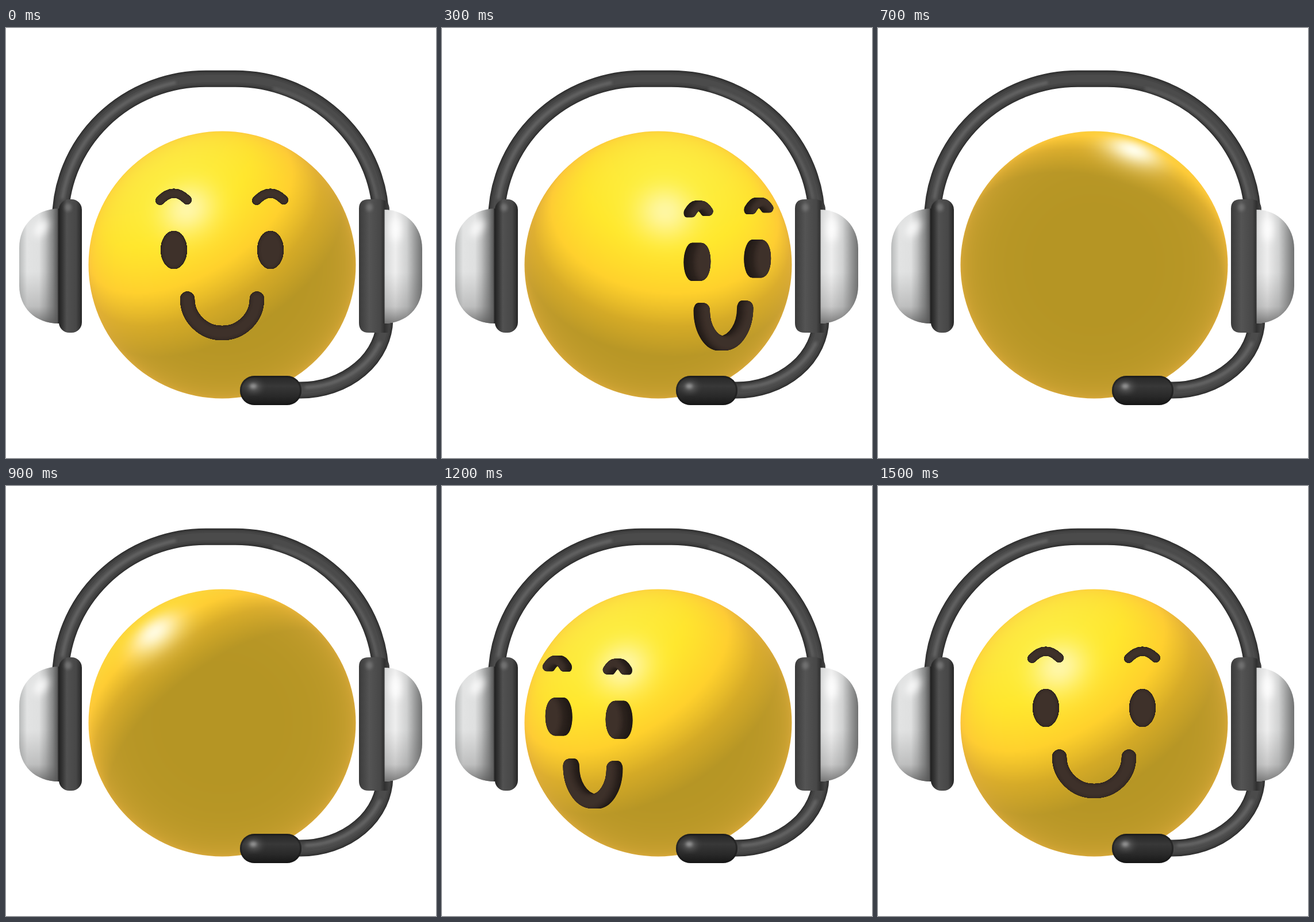
Recreate the animation shown at these times as an HTML page with a canvas. Size 748 px wide and 748 px high, loop 3000 ms.

```html
<!DOCTYPE html>
<html lang="en">
<head>
<meta charset="utf-8">
<title>Headset smiley</title>
<style>
  html, body { margin: 0; width: 100%; height: 100%; overflow: hidden; background: #fff; }
  canvas, svg { position: absolute; left: 0; top: 0; width: 748px; height: 748px; }
</style>
</head>
<body>
<canvas id="stage" width="748" height="748"></canvas>
<svg viewBox="0 0 748 748">
  <defs>
    <filter id="soft" x="-50%" y="-50%" width="200%" height="200%"><feGaussianBlur stdDeviation="2.5"/></filter>
    <filter id="wide" x="-80%" y="-80%" width="260%" height="260%"><feGaussianBlur stdDeviation="7"/></filter>
    <linearGradient id="barL">
      <stop offset="0" stop-color="#222"/><stop offset=".14" stop-color="#333"/>
      <stop offset=".34" stop-color="#515151"/><stop offset=".75" stop-color="#474747"/>
      <stop offset="1" stop-color="#262626"/>
    </linearGradient>
    <linearGradient id="barR">
      <stop offset="0" stop-color="#3a3a3a"/><stop offset=".16" stop-color="#474747"/>
      <stop offset=".34" stop-color="#545454"/><stop offset=".7" stop-color="#474747"/>
      <stop offset=".84" stop-color="#303030"/><stop offset="1" stop-color="#444"/>
    </linearGradient>
    <linearGradient id="cupL">
      <stop offset="0" stop-color="#b8baba"/><stop offset=".2" stop-color="#e2e3e3"/>
      <stop offset=".5" stop-color="#dfe0e0"/><stop offset=".66" stop-color="#bebfbf"/>
      <stop offset=".85" stop-color="#858686"/><stop offset="1" stop-color="#4a4a4a"/>
    </linearGradient>
    <linearGradient id="cupR">
      <stop offset="0" stop-color="#d4d5d5"/><stop offset=".3" stop-color="#eee"/>
      <stop offset=".6" stop-color="#cfd0d0"/><stop offset=".85" stop-color="#929393"/>
      <stop offset="1" stop-color="#707171"/>
    </linearGradient>
    <linearGradient id="fall" x2="0" y2="1">
      <stop offset=".55" stop-color="#666" stop-opacity="0"/>
      <stop offset=".85" stop-color="#666" stop-opacity=".28"/>
      <stop offset="1" stop-color="#555" stop-opacity=".75"/>
    </linearGradient>
    <linearGradient id="mic" x2="0" y2="1">
      <stop offset="0" stop-color="#252525"/><stop offset=".35" stop-color="#383838"/>
      <stop offset=".7" stop-color="#292929"/><stop offset="1" stop-color="#171717"/>
    </linearGradient>
    <path id="band" d="M94.500 334A253 246 0 0 1 347.500 88.300H399A253 246 0 0 1 652 334"/>
    <path id="arm" d="M659 505A147 125 0 0 1 512 630H506"/>
    <path id="cupShapeL" d="M92 314C50 315 23 344 23 382V448C23 486 50 514 92 514Z"/>
    <path id="cupShapeR" d="M657 316C697 316 724 346 724 384V448C724 486 697 514 657 514Z"/>
  </defs>

  <g fill="none">
    <g id="tubes"></g>
    <g filter="url(#soft)" stroke-linecap="round">
      <path d="M98 296A251 244 0 0 1 294 95" stroke="#858585" stroke-width="4" opacity=".65"/>
      <path d="M466 106A247 240 0 0 1 645 296" stroke="#777" stroke-width="4" opacity=".6"/>
      <path d="M650 548A145 122 0 0 1 522 625" stroke="#828282" stroke-width="5" opacity=".6"/>
    </g>
  </g>

  <rect x="92" y="298" width="40" height="232" rx="18" fill="url(#barL)"/>
  <path d="M614 314Q614 298 631 298H648Q667 298 667 316V530H631Q614 530 614 513Z" fill="url(#barR)"/>
  <ellipse cx="632" cy="312" rx="6" ry="7" fill="#888" opacity=".55" filter="url(#soft)"/>
  <ellipse cx="108" cy="312" rx="6" ry="7" fill="#888" opacity=".6" filter="url(#soft)"/>

  <use href="#cupShapeL" fill="url(#cupL)"/>
  <use href="#cupShapeL" fill="url(#fall)"/>
  <ellipse cx="61" cy="348" rx="9" ry="17" fill="#fff" opacity=".9" filter="url(#wide)" transform="rotate(32 61 348)"/>
  <use href="#cupShapeR" fill="url(#cupR)"/>
  <use href="#cupShapeR" fill="url(#fall)"/>
  <ellipse cx="678" cy="350" rx="9" ry="22" fill="#fff" filter="url(#wide)"/>
  <path d="M91.500 314V514M657.500 316V514" stroke="#222" stroke-width="2.500" opacity=".75"/>

  <rect x="407" y="605" width="107" height="51" rx="25" fill="url(#mic)"/>
  <rect x="408.500" y="606.500" width="104" height="48" rx="23.500" fill="none" stroke="#141414" stroke-width="3" opacity=".45"/>
  <ellipse cx="431" cy="624" rx="10" ry="6" fill="#aaa" opacity=".75" filter="url(#wide)"/>
  <ellipse cx="430" cy="623" rx="6" ry="4" fill="#bbb" opacity=".6" filter="url(#soft)"/>
</svg>
<script>
const CX = 376, CY = 412, R = 232.5;
const LOOP = 3000, STEP = 100, LAST = 15;
const ctx = document.getElementById('stage').getContext('2d');

// Headset tubes: nested strokes give a rounded profile.
const tubeShades = [[29, '#303030'], [25, '#3b3b3b'], [20, '#454545'], [13, '#4b4b4b']];
document.getElementById('tubes').innerHTML = ['band', 'arm'].map(id =>
  tubeShades.map(([w, c]) => `<use href="#${id}" stroke="${c}" stroke-width="${w}"/>`).join('')
).join('');

const mix = (a, b, p) => a + (b - a) * p;

// Linear interpolation through rows of [position, value, ...].
function lookup(rows, x, col = 1) {
  let i = 0;
  while (i < rows.length - 2 && x > rows[i + 1][0]) i++;
  const a = rows[i], b = rows[i + 1];
  const p = Math.min(1, Math.max(0, (x - a[0]) / (b[0] - a[0])));
  return mix(a[col], b[col], p);
}

// Step -> light azimuth, and step -> face yaw, in degrees.
const lightTurn = [[0, -41], [3, 8], [5, 54.5], [7, 159], [10, 268], [12, 319], [15, 319]];
const faceTurn = [[0, 0], [5, 90], [10, 270], [15, 360]];

// Light level -> sphere colour.
const skin = [
  [0, 181, 149, 36], [0.28, 212, 170, 38], [0.52, 255, 209, 44],
  [0.78, 255, 232, 44], [1, 253, 240, 62]
];
const ramp = Array.from({ length: 257 }, (_, i) => [1, 2, 3].map(c => lookup(skin, i / 256, c)));
const rimColor = [250, 188, 80];
const glossColor = [255, 253, 232];

const size = Math.ceil(R * 2) + 2;
const ball = document.createElement('canvas');
ball.width = ball.height = size;
const ballCtx = ball.getContext('2d');
const image = ballCtx.createImageData(size, size);

function shadeBall(azimuth) {
  const a = azimuth * Math.PI / 180;
  const lx = 0.69 * Math.sin(a), ly = -0.724, lz = 0.69 * Math.cos(a);
  const n = Math.hypot(lx, ly, lz + 1);
  const hx = lx / n, hy = ly / n, hz = (lz + 1) / n;
  const gloss = Math.min(1, 0.52 + 0.9 * (1 - hz));
  const px = image.data;
  for (let j = 0; j < size; j++) {
    for (let i = 0; i < size; i++) {
      const x = (i + 0.5 - size / 2) / R, y = (j + 0.5 - size / 2) / R;
      const z = Math.sqrt(Math.max(0, 1 - x * x - y * y));
      const lit = Math.max(0, Math.min(1, x * lx + y * ly + z * lz));
      const base = ramp[Math.round(lit * 256)];
      const rim = 0.55 * Math.pow(1 - z, 2);
      const shine = gloss * Math.pow(Math.max(0, x * hx + y * hy + z * hz), 45);
      const o = (j * size + i) * 4;
      for (let c = 0; c < 3; c++) {
        px[o + c] = mix(mix(base[c], rimColor[c], rim), glossColor[c], shine);
      }
      px[o + 3] = 255;
    }
  }
  ballCtx.putImageData(image, 0, 0);
}

function drawBall() {
  ctx.save();
  ctx.beginPath();
  ctx.arc(CX, CY, R, 0, Math.PI * 2);
  ctx.clip();
  ctx.drawImage(ball, CX - size / 2, CY - size / 2);
  ctx.restore();
}

// Each part draws one slice of its solid, shrunk by an inset.
// "sunk" is the share of its depth that shows at the start of a turn.
const eye = x => ({
  x, depth: 30, sunk: 0.85, bevel: 8, shift: 0,
  slice(inset) {
    ctx.beginPath();
    ctx.ellipse(x, 386, 22.7 - inset, 33 - inset, 0, 0, Math.PI * 2);
    ctx.fill();
  }
});
const brow = x => ({
  x, depth: 29, sunk: 0.4, bevel: 6, shift: 6,
  slice(inset) {
    ctx.lineWidth = 15.5 - 2 * inset;
    ctx.beginPath();
    ctx.moveTo(x - 23.5, 300);
    ctx.quadraticCurveTo(x, 275.5, x + 23.5, 299);
    ctx.stroke();
  }
});
const smile = {
  x: 0, depth: 33, sunk: 0.4, bevel: 9, shift: -4,
  slice(inset) {
    ctx.lineWidth = 25 - 2 * inset;
    ctx.beginPath();
    ctx.ellipse(0, 471, 60.5, 59.5, 0, Math.PI, 0, true);
    ctx.stroke();
  }
};
const parts = [eye(-84), eye(84), brow(-84.5), brow(83.5), smile];

function drawFace(yaw) {
  if (yaw > 180) yaw -= 360;
  if (Math.abs(yaw) > 90) return;
  const side = Math.sign(yaw), u = Math.abs(yaw) / 90;
  const sin = Math.sin(yaw * Math.PI / 180);
  // A little perspective keeps the parts apart when seen edge-on.
  const cos = Math.cos(yaw * Math.PI / 180) + 0.045 * Math.abs(sin);
  const move = 215 * (0.65 * u + 0.35 * u * u);
  ctx.lineCap = 'round';
  ctx.lineJoin = 'round';
  // Far parts first.
  for (const p of [...parts].sort((a, b) => (b.x - a.x) * side)) {
    const x = CX + side * (move + p.shift * 4 * u * (1 - u));
    const depth = p.depth * mix(p.sunk, 1, u * u);
    const edge = depth - p.bevel;
    for (let z = 0; z <= depth; z += 0.5) {
      const b = Math.max(0, z - edge);
      const inset = p.bevel - Math.sqrt(p.bevel * p.bevel - b * b);
      const v = z < edge ? mix(31, 46, z / edge) : mix(46, 62, b / p.bevel);
      ctx.fillStyle = ctx.strokeStyle = `rgb(${v}, ${v * 0.79}, ${v * 0.68})`;
      ctx.setTransform(cos, -0.04 * sin, 0, 1, x + z * sin, 30 * u);
      p.slice(Math.min(inset, 6.5));
    }
  }
  ctx.setTransform(1, 0, 0, 1, 0, 0);
}

let shown = -1;
function render(time) {
  const k = Math.min(LAST, Math.floor((time % LOOP) / STEP));
  if (k === shown) return;
  shown = k;
  ctx.clearRect(0, 0, 748, 748);
  shadeBall(lookup(lightTurn, k));
  drawBall();
  drawFace(lookup(faceTurn, k));
}

const start = performance.now();
function tick() {
  render(performance.now() - start);
  requestAnimationFrame(tick);
}
tick();
</script>
</body>
</html>
```
